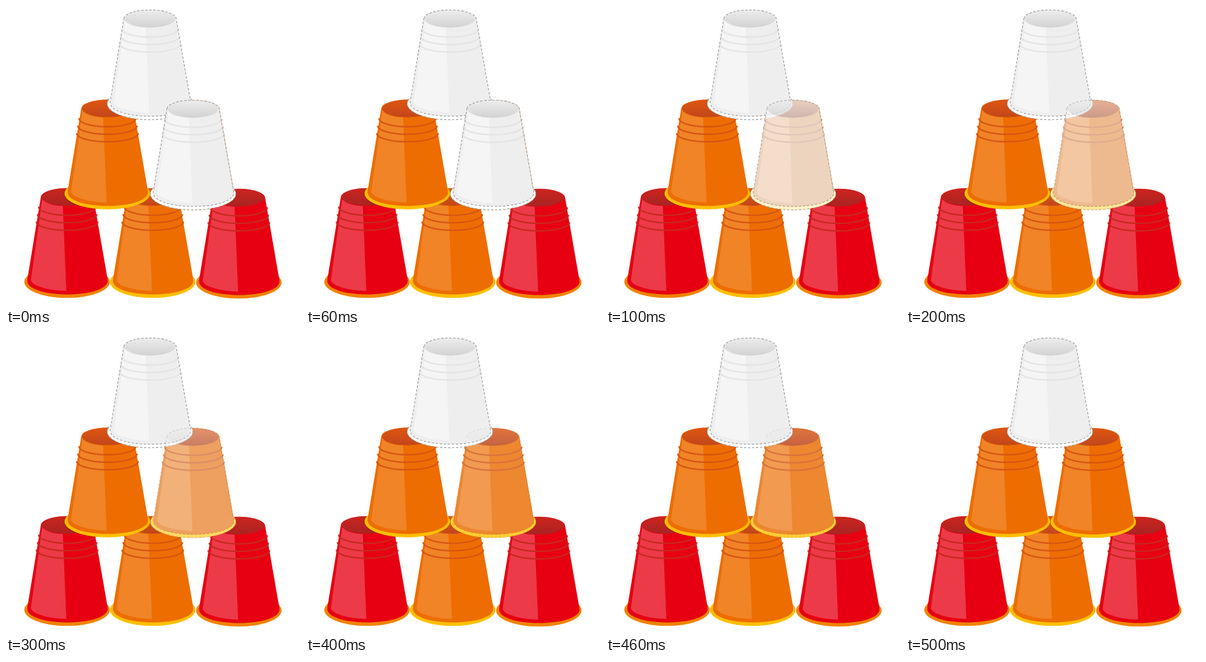
An HTML page that plays this animation: 469x479 px, repeating every 0.6 s.

```html
<!DOCTYPE html>
<html lang="en">
<head>
<meta charset="utf-8">
<title>Stacked cups</title>
<style>
html, body { margin: 0; width: 100%; height: 100%; overflow: hidden; background: #fff; }
svg { display: block; width: 469px; height: 479px; }
</style>
</head>
<body>
<svg id="stage" viewBox="0 0 469 479"></svg>
<script>
const stage = document.getElementById('stage');

const palettes = {
  red: { body: '#e60012', shine: '#ec3a49', rim: '#f08300', ring: '#c9281f', inside: ['#c9241f', '#a92422'] },
  orange: { body: '#ed6d00', shine: '#f08427', rim: '#fcbf00', ring: '#d65513', inside: ['#dc5412', '#c2461b'] },
  ghost: { body: '#eeeeee', shine: '#f5f5f5', rim: '#ffffff', ring: '#e4e4e4', inside: ['#eaeaea', '#d2d2d2'], dash: '#999' }
};

const bodyPath = 'M188 20A41.8 14.5 0 0 1 271.5 20L294.5 152.5C297 167 266 176 230 176S164 167 166.300 152.500Z';
const shinePath = 'M190 24Q199 34 223 35L228.500 170.500C203 170 173 163 172 153Z';

// Each ring: half width, end height
const rings = [[45.5, 36], [47.3, 48], [49, 60]];

function gradient(name, [top, bottom]) {
  return `<linearGradient id="${name}" x1="0" y1="0" x2="0" y2="1">
    <stop offset="0.1" stop-color="${top}"/><stop offset="1" stop-color="${bottom}"/>
  </linearGradient>`;
}

function cup(name, x, y, id = '') {
  const p = palettes[name];
  const line = p.dash ? `stroke="${p.dash}" stroke-width="1.1" stroke-dasharray="3.8 2.6"` : '';
  const ringPaths = rings.map(([r, h]) =>
    `<path d="M${229.8 - r} ${h}A${r} 13.6 0 0 0 ${229.8 + r} ${h}"/>`).join('');
  return `<g id="${id}" transform="translate(${x} ${y})">
    <ellipse cx="229.7" cy="156" rx="68.2" ry="25.6" fill="${p.rim}" ${line}/>
    <path d="${bodyPath}" fill="${p.body}"/>
    <path d="${shinePath}" fill="${p.shine}"/>
    <g fill="none" stroke="${p.ring}" stroke-width="2.4">${ringPaths}</g>
    <ellipse cx="229.7" cy="20.4" rx="40.4" ry="14" fill="url(#${name})"/>
    <path d="${bodyPath}" fill="none" ${line}/>
  </g>`;
}

stage.innerHTML =
  `<defs>${Object.entries(palettes).map(([name, p]) => gradient(name, p.inside)).join('')}</defs>` +
  cup('red', -132.3, 284.5) +
  cup('orange', 4.3, 284.5) +
  cup('red', 141.7, 285.5) +
  cup('orange', -68, 143.2) +
  cup('orange', 69, 144) +
  cup('ghost', 0, 0) +
  cup('ghost', 68.7, 144, 'veil');

const veil = document.getElementById('veil');
const STEP = 100, STEPS = 6;

// The pale cup fades in even steps, uncovering the orange one
function draw(ms) {
  const step = Math.floor(ms / STEP) % STEPS;
  veil.setAttribute('opacity', 1 - step / (STEPS - 1));
}

const start = performance.now();
function tick() {
  draw(performance.now() - start);
  requestAnimationFrame(tick);
}
tick();
</script>
</body>
</html>
```
